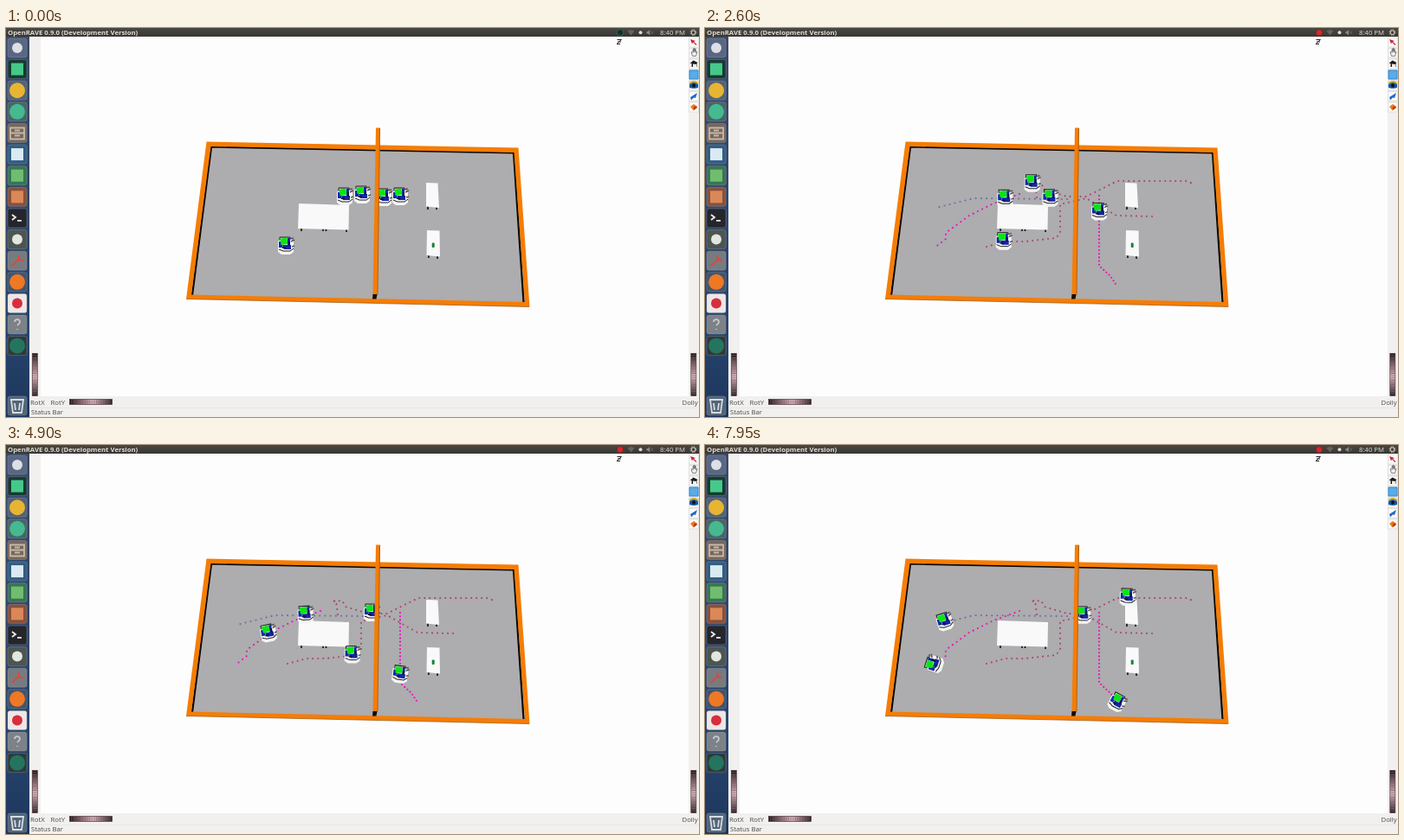
An HTML page for the animation above (8000 ms loop, 800 by 450 pixels).

```html
<!DOCTYPE html>
<html lang="en">
<head>
<meta charset="utf-8">
<title>Robot simulation</title>
<style>
  html, body { margin: 0; width: 100%; height: 100%; overflow: hidden; background: #fff; }
  svg { display: block; width: 100%; height: 100%; }
  text { font: 7.75px "Open Sans", "Noto Sans", sans-serif; fill: #4a4a48; }
  .bar { fill: #dfdbd2; }
  .title { font-weight: 700; }
  .trail { fill: none; stroke-width: 2.1; stroke-linecap: round; }
  #trails { animation: appear 8s step-end infinite; }
  #recording { animation: appear-early 8s step-end infinite; }
  @keyframes appear { 0% { opacity: 0 } 21.875% { opacity: 1 } }
  @keyframes appear-early { 0% { opacity: 0 } 5% { opacity: 1 } }
</style>
</head>
<body>
<svg viewBox="0 0 800 450" xmlns="http://www.w3.org/2000/svg">
  <defs>
    <linearGradient id="topbar" x2="0" y2="1">
      <stop stop-color="#4a4843"/><stop offset="1" stop-color="#383733"/>
    </linearGradient>
    <linearGradient id="dock" x2="0" y2="1">
      <stop stop-color="#3c4a66"/><stop offset=".8" stop-color="#27436b"/>
      <stop offset="1" stop-color="#1c355c"/>
    </linearGradient>
    <linearGradient id="roll">
      <stop stop-color="#1c1416"/><stop offset=".25" stop-color="#7b6065"/>
      <stop offset=".55" stop-color="#d9b3bc"/><stop offset="1" stop-color="#2c2023"/>
    </linearGradient>
    <g id="wheel">
      <rect width="49" height="6" fill="url(#roll)" stroke="#4b363b" stroke-width=".7"/>
      <path d="M2 3H47" stroke="#84636b" stroke-width="4" stroke-dasharray=".6 2"/>
    </g>
    <g id="robot">
      <path d="M-9-4L-6-8H4L9-4V8L5 11H-5L-9 8Z" fill="#f4f4f4"/>
      <path d="M-7-5V-9H5V-7M-8 5L-3 7H5L9 4" fill="none" stroke="#222"/>
      <path d="M4-7L9-8M6-4L10-6M7 2L10 1" stroke="#555" stroke-width="1.500"/>
      <path d="M-8-4H-4V3H-8ZM2-8H5V0H2ZM-4 0H6V5H-2Z" fill="#1226a6"/>
      <path d="M-4 2H0V4H-4ZM3-4H5V1H3Z" fill="#111438"/>
      <path d="M-6.500-7.500L1.500-8.300L2.300-1L-5.500 0Z" fill="#08e514"/>
    </g>
  </defs>

  <rect width="800" height="450" fill="#fefdfe"/>
  <path d="M27 10H40V426H788V10H800V450H27Z" fill="#f1f0ef"/>
  <path d="M27 439.500H800" stroke="#e5e3e1" stroke-width=".7"/>

  <path d="M234 134L590 141L602 320L211 311Z" fill="#adacae"/>
  <path d="M215 309L237 137.500L586 144.500L597.500 317" fill="none" stroke="#080808" stroke-width="2.200"/>
  <g id="tables">
    <path d="M341 231v4M366 232v3M369.500 232v3M393 233v3M487 206v4M497 207v3M488 263v3M498 264v3" stroke="#111" stroke-width="1.600"/>
    <path d="M338 203L396 205L395.500 233.500L337 232ZM485 179L498.500 179.500L500 208L485 206.500ZM486 234L500.500 234.500L501 264.500L485.500 263Z" fill="#f9f9f9"/>
    <rect x="491.700" y="248.500" width="3" height="5.500" rx="1" fill="#168336"/>
  </g>
  <g id="trails"></g>
  <g id="robots"></g>
  <g fill="#f57d05">
    <path fill-rule="evenodd" d="M231.500 131.500L591.500 138.500L604.500 322.500L208 313.500ZM236.500 137L214 308.500L599 317L586.500 144Z"/>
    <path d="M427 115.500H432L429 309H423.500Z"/>
  </g>
  <path d="M423.500 308H428.500L427.500 313.500H423Z" fill="#120c04"/>
  <path d="M431.500 116L429 308M208 313.500L604 322.500" stroke="#95500b" stroke-width=".7"/>

  <use href="#wheel" x="73.500" y="429.500"/>
  <use href="#wheel" transform="translate(36.300 376.500) rotate(90)"/>
  <use href="#wheel" transform="translate(796.800 376.500) rotate(90)"/>
  <text x="28" y="435.500">RotX</text>
  <text x="51.500" y="435.500">RotY</text>
  <text x="780.500" y="435.500">Dolly</text>
  <text x="29" y="446.800">Status Bar</text>

  <rect y="10" width="27" height="440" fill="url(#dock)"/>
  <g id="launcher"></g>

  <rect width="800" height="10" fill="url(#topbar)"/>
  <text class="bar title" x="2" y="7.900">OpenRAVE 0.9.0 (Development Version)</text>
  <text class="bar" x="755" y="7.900">8:40 PM</text>
  <circle cx="709" cy="5.300" r="3.800" fill="#172e2a" stroke="#397460" stroke-width=".8"/>
  <circle id="recording" cx="709" cy="5.300" r="3.800" fill="#d02a30" stroke="#701a1c" stroke-width=".8"/>
  <path d="M717.500 3.500Q721.500 .8 725.500 3.500L721.500 8.500Z" fill="#66635d"/>
  <circle cx="732.500" cy="5.300" r="2" fill="#dfdbd2"/>
  <path d="M739.500 4h1.500l2.200-2v6.500l-2.200-2h-1.500z" fill="#8d8981"/>
  <path d="M744.500 3.500l2.500 3.500m0-3.500l-2.500 3.500" stroke="#706d67" stroke-width=".7"/>
  <g fill="none" stroke="#dfdbd2">
    <circle cx="793.500" cy="5.200" r="2.300"/>
    <circle cx="793.500" cy="5.200" r="3.400" stroke-dasharray="1.300 1.370"/>
  </g>
  <path d="M705.500 13.500H710.500L705 18.500H709M706 16H710" fill="none" stroke="#222"/>

  <g id="tools"></g>
  <path d="M790 13l6 2-2 1 3.500 3-1 1-3.500-3.500-1 2z" fill="#cf2334"/>
  <path d="M791 28l1-.5 1 1v-4h1v3-4h1.200v4-3h1.200v4l1.600-1-1.500 5h-4z" fill="#eee" stroke="#555" stroke-width=".7"/>
  <path d="M789.500 41l4-3.500 5 2.500-1 1v4h-6v-4z" fill="#191919"/>
  <path d="M793 41.500l4 .5v3h-4z" fill="#eee"/>
  <path d="M789 49h10v10h-10z" fill="#5aabe7" stroke="#3189d0"/>
  <path d="M789 65q5-5 10 0v4q-5 2-10 0z" fill="#14599f"/>
  <path d="M789 64q5-4 10 0" fill="none" stroke="#d7ac29" stroke-width="1.700"/>
  <circle cx="794" cy="66.500" r="2" fill="#111"/>
  <path d="M790 80l8-5-2 6-2-.5-3 3z" fill="#2568c9"/>
  <path d="M790 91l4-3 3.500 2.500v2l-4 3z" fill="#ed7a18"/>
  <path d="M794 91l3.500-.5v2l-3.500 2.500z" fill="#b93815"/>
</svg>
<script>
const NS = "http://www.w3.org/2000/svg";
const LOOP = 8000;
const START = 1750;
const GLIDE = 500;
const LIFT = 2;

function add(parent, tag, attributes) {
  const node = document.createElementNS(NS, tag);
  for (const [name, value] of Object.entries(attributes)) node.setAttribute(name, value);
  return document.getElementById(parent).appendChild(node);
}

// Each robot glides from its parking place to its trail, then follows it at a steady speed.
const robots = [
  { parked: [391, 194], speed: 21, turn: -72, colour: "#ee08bd", gap: 5.8,
    route: "M363 192L333 203L305 217L278 237V244L264 255" },
  { parked: [411, 192], speed: 23, turn: 8, colour: "#ae3d6e", gap: 6,
    route: "M383 196L381 180L376 181L388 180L392 187L418 195H440L476 177H555L566 181" },
  { parked: [436, 195], speed: 23, turn: -22, colour: "#6d6da5", gap: 6.2,
    route: "M418 198L310 197L267 208" },
  { parked: [455, 194], speed: 23, turn: 28, colour: "#ee08bd", gap: 4.2,
    route: "M455 194V275L468 287L476 299" },
  { parked: [323, 251], speed: 24, turn: 0, colour: "#ad456c", gap: 6,
    route: "M325 253L347 247H369L405 243L410 237V204L440 197L475 217L517 218" }
].map(robot => {
  const trail = add("trails", "path", {
    class: "trail", d: robot.route, stroke: robot.colour, "stroke-dasharray": `0 ${robot.gap}`
  });
  const node = add("robots", "use", { href: "#robot" });
  return { ...robot, trail, node, length: trail.getTotalLength() };
});

function place({ parked, speed, turn, trail, node, length }, time) {
  const elapsed = Math.max(0, time - START);
  const progress = Math.min(1, speed * elapsed / 1000 / length);
  const onTrail = Math.min(1, elapsed / GLIDE);
  const point = trail.getPointAtLength(progress * length);
  const x = parked[0] + (point.x - parked[0]) * onTrail;
  const y = parked[1] + (point.y - LIFT - parked[1]) * onTrail;
  node.setAttribute("transform", `translate(${x} ${y}) rotate(${turn * progress ** 3})`);
}

const shapes = {
  dot: "M6 0a6 6 0 1 1-12 0a6 6 0 1 1 12 0",
  disc: "M9 0a9 9 0 1 1-18 0a9 9 0 1 1 18 0",
  square: "M-7-7h14v14h-14z"
};
const lineArt = {
  drawer: "M-8-6h16v13h-16zM-8 0h16M-3 3h6M-3-3h6",
  prompt: "M-6-4l4 3-4 3M0 3h5",
  tool: "M-6 6L3-3M1-6l1 5 5 1",
  help: "M-3-3q0-3 3-3t3 3q0 2-3 4M0 5v1",
  bin: "M-7-7h14l-2 15h-10zM-8-7h16M-3-3l1 8M3-3l-1 8"
};
// Tile colour, symbol colour, symbol.
const launcher = `
  #596783 #dce0e5 dot,    #173a31 #45c98a square, #52627a #e7b532 disc,   #486466 #45b98f disc,
  #77675c #c6b8a7 drawer, #315e83 #dbe9f1 square, #397456 #70bd6e square, #86513d #db8858 square,
  #25252c #eeeeee prompt, #4d5550 #e2e6df dot,    #777b80 #db4938 tool,   #40546d #ee7824 disc,
  #eee7e7 #d82d3c dot,    #7c8288 #c5c9cc help,   #303936 #24755f disc,   #526579 #d7dce0 bin`;
launcher.split(",").forEach((entry, i, all) => {
  const [tile, colour, symbol] = entry.trim().split(/\s+/);
  const y = i === all.length - 1 ? 437 : 23 + i * 24.62;
  const paint = symbol in shapes ? { fill: colour } : { fill: "none", stroke: colour, "stroke-width": 1.8 };
  add("launcher", "rect", {
    x: 2, y: y - 11, width: 22, height: 22, rx: 2.5,
    fill: tile, stroke: "#a4afbd", "stroke-opacity": .45, "stroke-width": .7
  });
  add("launcher", "path", {
    d: shapes[symbol] || lineArt[symbol], transform: `translate(13 ${y})`, ...paint
  });
});

for (let i = 0; i < 7; i++) {
  add("tools", "rect", {
    x: 788.5, y: 11 + i * 12.5, width: 11, height: 11,
    fill: "#fafafa", stroke: "#d2d0ce", "stroke-width": .6
  });
}

function draw(now) {
  for (const robot of robots) place(robot, now % LOOP);
  requestAnimationFrame(draw);
}
draw(performance.now());
</script>
</body>
</html>
```
